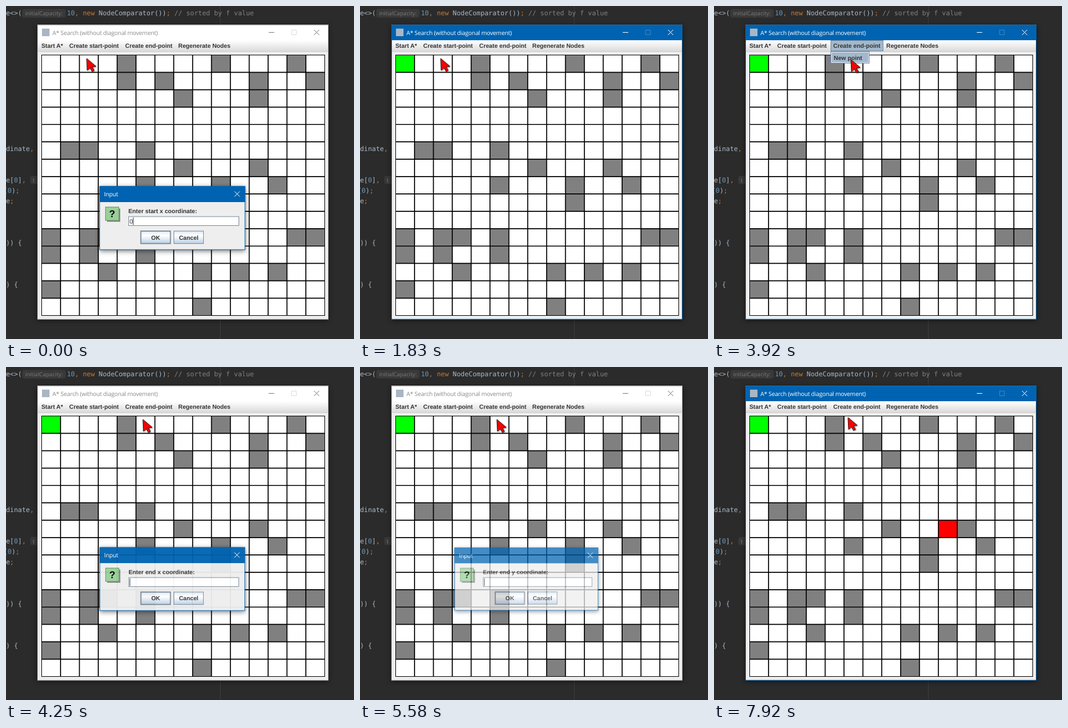
Animation of 600 by 574 pixels, one loop 8 s. Source, as an HTML page:

```html
<!DOCTYPE html>
<html lang="en">
<head>
<meta charset="utf-8">
<title>A* Search</title>
<style>
  html, body { margin: 0; width: 100%; height: 100%; overflow: hidden; background: #2b2b2b; }
  svg { display: block; width: 600px; height: 574px; }
  text { white-space: pre; text-rendering: geometricPrecision; }
  .code { font: 11.4px "DejaVu Sans Mono", monospace; fill: #a9b7c6; }
  .code .num { fill: #6897bb; }
  .code .key { fill: #cc7832; }
  .code .note { fill: #808080; }
  .hint { font: 9.6px "Open Sans", sans-serif; fill: #7a7a7a; }
  .title { font: 10.2px "Open Sans", sans-serif; letter-spacing: -.2px; }
  .ui { font: bold 10.25px "Liberation Sans", Arial, sans-serif; fill: #333; }
  .field { font: 10.4px "Liberation Sans", Arial, sans-serif; fill: #333; }
  .mid { text-anchor: middle; }
  .line { fill: none; stroke-width: 1; }
  .shadow { filter: drop-shadow(0 2px 4px #0008); }
  .dialog { transform-origin: 287px 366px; }
</style>
</head>
<body>
<svg viewBox="0 0 600 574">
  <defs>
    <linearGradient id="bar" x2="0" y2="1">
      <stop stop-color="#fff"/><stop offset="1" stop-color="#dadada"/>
    </linearGradient>
    <linearGradient id="button" x2="0" y2="1">
      <stop stop-color="#dde8f3"/><stop offset=".35" stop-color="#fff"/>
      <stop offset=".6" stop-color="#e6eef6"/><stop offset="1" stop-color="#b8cfe5"/>
    </linearGradient>
  </defs>

  <rect width="600" height="574" fill="#2b2b2b"/>
  <path d="M369.5 0V574" stroke="#3d3d3d"/>
  <g class="code">
    <rect x="28" y="5" width="75" height="15" rx="4" fill="#393939"/>
    <rect x="42" y="293" width="20" height="14" rx="4" fill="#393939"/>
    <text class="hint" x="33" y="16" textLength="">initialCapacity:</text>
    <text class="hint" x="46" y="304">t</text>
    <text x="0" y="16">e&lt;&gt;(</text>
    <text x="105" y="16"><tspan class="num">10</tspan><tspan class="key">, new</tspan> NodeComparator())<tspan class="key">;</tspan><tspan class="note"> // sorted by f value</tspan></text>
    <text x="0" y="250">dinate<tspan class="key">,</tspan></text>
    <text x="0" y="304">e[<tspan class="num">0</tspan>]<tspan class="key">,</tspan></text>
    <text x="-4" y="322">(<tspan class="num">0</tspan>)<tspan class="key">;</tspan></text>
    <text x="0" y="340">e<tspan class="key">;</tspan></text>
    <text x="0" y="412">)) {</text>
    <text x="0" y="484">) {</text>
  </g>

  <rect class="shadow" x="54" y="32.5" width="502" height="507.5" fill="#eee"/>
  <rect id="titleBar" x="54" y="32.5" width="502" height="26.5"/>
  <rect x="62" y="39" width="13" height="13" fill="#a9b6c4"/>
  <text id="titleText" class="title" x="80" y="50">A* Search (without diagonal movement)</text>
  <path id="winButtons" class="line" d="M453 45.5h9.5M531 41l9 9m0-9l-9 9"/>
  <path id="maxButton" class="line" d="M492.5 41.5h8v8h-8z"/>
  <rect x="55" y="59" width="500" height="19.5" fill="url(#bar)"/>
  <path d="M55 78.5H555" stroke="#ccc"/>
  <rect id="menuMark" x="201.5" y="59.5" width="90" height="18" fill="#a3b8cc" stroke="#7a8a99"/>
  <g class="ui">
    <text x="61" y="72">Start A*</text>
    <text x="109" y="72">Create start-point</text>
    <text x="205.5" y="72">Create end-point</text>
    <text x="297" y="72">Regenerate Nodes</text>
  </g>
  <rect id="frame" class="line" x="54.5" y="33" width="501" height="507"/>

  <rect x="61" y="84" width="489" height="450" fill="#fff"/>
  <g id="cells"></g>
  <path id="grid" class="line" stroke="#000" style="stroke-width:1.7"/>
  <rect class="line" x="61.5" y="84.5" width="488" height="449" stroke="#000"/>

  <g id="popup">
    <rect x="201.5" y="78.5" width="66" height="20" fill="#eee" stroke="#6382bf"/>
    <rect id="itemMark" x="203" y="80" width="63" height="17" fill="#a3b8cc"/>
    <text class="ui" x="206.5" y="93">New point</text>
  </g>
  <g id="dialogs"></g>
  <path id="cursor" d="M0 0L16 13.5L9.5 14.5L13 20.5L9.5 22.5L6 16L1 20.5Z"
    fill="#f00" stroke="#3a1010" stroke-linejoin="round" style="filter:drop-shadow(1.5px 1.5px 1px #0007)"/>
</svg>
<script>
const LOOP = 8000, BLUE = '#0063b1';
const $ = id => document.getElementById(id);
const colX = i => 61.5 + i * 488 / 15;
const rowY = i => 84.5 + i * 449 / 15;

// Blocked columns of each row
const walls = [[4, 9, 13], [4, 6, 11, 14], [7, 11], [], [], [1, 2, 5], [7, 11], [5, 9, 12],
  [9], [], [0, 2, 3, 5, 13, 14], [0, 2, 5], [3, 8, 10, 12], [0], [8]];

const cell = (col, row, fill, id = '') =>
  `<rect id="${id}" x="${colX(col)}" y="${rowY(row)}" width="32.5" height="30" fill="${fill}"/>`;

$('cells').innerHTML = walls.map((cols, row) => cols.map(c => cell(c, row, '#808080')).join('')).join('')
  + cell(0, 0, '#0f0', 'start') + cell(10, 6, '#f00', 'end');

let lines = '';
for (let i = 1; i < 15; i++) lines += `M${colX(i)} 84V534M61 ${rowY(i)}H550`;
$('grid').setAttribute('d', lines);

// keys: [time, field text from then on]
const dialogs = [
  { open: -999, close: 500, label: 'start x', keys: [[-1, '0']] },
  { open: 540, close: 1630, label: 'start y', keys: [[1330, '0']] },
  { open: 4055, close: 5420, label: 'end x', keys: [[4580, '1'], [4830, '10']] },
  { open: 5460, close: 6670, label: 'end y', keys: [[6330, '6']] }
];

const button = (x, label, weight) => `
  <rect x="${x + .5}" y="388" width="51" height="21.5" fill="url(#button)" stroke="#7a8a99" stroke-width="${weight}"/>
  <text class="ui mid" x="${x + 26}" y="402.5">${label}</text>`;

$('dialogs').innerHTML = dialogs.map(d => `<g class="dialog">
  <rect class="shadow" x="161.5" y="311" width="250.5" height="109" fill="#eee" stroke="${BLUE}"/>
  <rect x="161" y="310.5" width="251.5" height="27.5" fill="${BLUE}"/>
  <text class="title" x="169" y="328" fill="#fff">Input</text>
  <path class="line" d="M394 319.5l9 9m0-9l-9 9" stroke="#fff"/>
  <rect x="174" y="349" width="23" height="23" fill="#8a8a8a"/>
  <rect x="171.5" y="346.5" width="23" height="23" fill="#99cf99" stroke="#669966"/>
  <text class="ui mid" x="183" y="364" style="font-size:17px;fill:#000">?</text>
  <text class="ui" x="211" y="357">Enter ${d.label} coordinate:</text>
  <rect x="211.5" y="363" width="190" height="15.5" fill="#fff" stroke="#7a8a99"/>
  <text class="field" x="213" y="375"></text>
  <path class="caret" stroke="#333" d="M213.5 364.5v13"/>
  ${button(232, 'OK', 1.8)}${button(289, 'Cancel', 1)}
</g>`).join('');
dialogs.forEach((d, i) => d.node = $('dialogs').children[i]);

// Cursor stops: [time, x, y]
const path = [[0, 139, 90.5], [2750, 139, 90.5], [3250, 238, 65], [3580, 238, 65],
  [3850, 236, 92.5], [4000, 236, 92.5], [4200, 236, 90.5], [7500, 236, 90.5], [7900, 231, 87], [LOOP, 231, 87]];

const clamp = v => Math.min(1, Math.max(0, v));
const smooth = p => p * p * (3 - 2 * p);
const show = (node, on) => node.style.display = on ? '' : 'none';

function cursorAt(t) {
  const i = path.findIndex(p => p[0] > t);
  const [t0, x0, y0] = path[i - 1], [t1, x1, y1] = path[i];
  const p = smooth((t - t0) / (t1 - t0));
  return `translate(${x0 + (x1 - x0) * p} ${y0 + (y1 - y0) * p})`;
}

function drawDialog(d, t) {
  const enter = 1 - (1 - clamp((t - d.open) / 250)) ** 2;
  const level = enter * (1 - clamp((t - d.close) / 140));
  show(d.node, level > 0);
  d.node.style.opacity = level;
  d.node.style.transform = `scale(${.95 + .05 * level})`;
  const typed = d.keys.reduce((text, [at, value]) => t >= at ? value : text, '');
  d.node.querySelector('.field').textContent = typed;
  d.node.querySelector('.caret').setAttribute('transform', `translate(${typed.length * 5.8})`);
}

function draw(t) {
  const active = t >= 1660 && t < 4040 || t >= 6720;
  $('titleBar').setAttribute('fill', active ? BLUE : '#fff');
  $('titleText').setAttribute('fill', active ? '#fff' : '#8a8a8a');
  $('winButtons').setAttribute('stroke', active ? '#fff' : '#777');
  $('maxButton').setAttribute('stroke', active ? '#3d86c2' : '#dcdcdc');
  $('frame').setAttribute('stroke', active ? BLUE : '#b4b4b4');
  show($('start'), t >= 1660);
  show($('end'), t >= 6720);
  const menu = t >= 3400 && t < 4000;
  show($('menuMark'), menu);
  show($('popup'), menu);
  show($('itemMark'), t >= 3720);
  dialogs.forEach(d => drawDialog(d, t));
  $('cursor').setAttribute('transform', cursorAt(t));
}

function tick() {
  draw(performance.now() % LOOP);
  requestAnimationFrame(tick);
}
tick();
</script>
</body>
</html>
```
